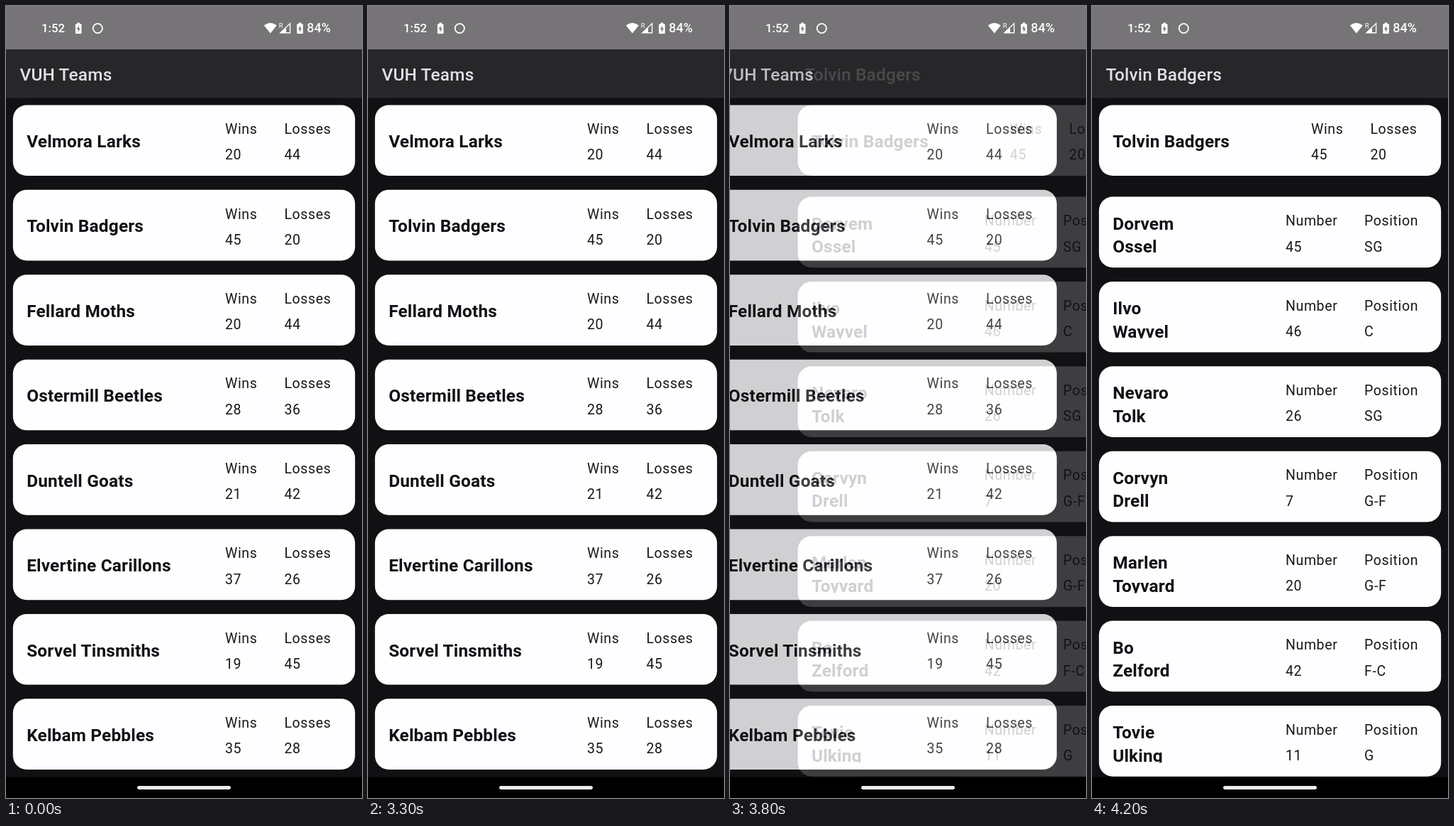
Animation, 502 px wide and 1115 px high, one loop 5400 ms. Source, as an HTML page:

```html
<!DOCTYPE html>
<html lang="en">
<head>
<meta charset="utf-8">
<title>Team list</title>
<style>
  html, body { margin: 0; width: 100%; height: 100%; overflow: hidden; background: #111013; }
  svg { font-family: Roboto, "Noto Sans", sans-serif; }
  #stage { display: block; width: 100%; height: 100%; }
  .title { font-size: 24.4px; font-weight: 500; letter-spacing: .18px; fill: #e2e0e4; }
  .name { font-size: 24.4px; font-weight: 700; letter-spacing: .18px; fill: #111014; }
  .stat { font-size: 19.53px; letter-spacing: .61px; fill: #19181b; }
  .status { font-weight: 500; fill: #fff; }
</style>
</head>
<body>
<svg id="stage" viewBox="0 0 502 1115">
  <g id="list"></g>
  <g id="detail"></g>

  <rect width="502" height="61" fill="#767477"/>
  <g fill="#fff">
    <text class="status" x="50" y="37.4" font-size="16.7">1:52</text>
    <g id="battery">
      <path d="M100.4 25.3v-1.700h3.600v1.700h1.500q1 0 1 1v11.800q0 1-1 1h-6.600q-1 0-1-1v-11.800q0-1 1-1z"/>
      <path d="M102.700 27.500l-3 5.300h2v4l3-5.300h-2z" fill="#767477"/>
    </g>
    <circle cx="129.300" cy="31.500" r="6.600" fill="none" stroke="#fff" stroke-width="1.800"/>
    <path d="M372.800 38.500L363.800 27.300Q372.800 20.300 381.800 27.300Z"/>
    <path d="M387 37.800L400.600 24.600V37.800Z" fill="none" stroke="#fff" stroke-width="1.400"/>
    <path d="M387 38L395 30.300V38Z"/>
    <text x="384.800" y="30.500" font-size="9.500">R</text>
    <use href="#battery" x="312.300"/>
    <text class="status" x="424.300" y="37.400" font-size="17.900">84%</text>
  </g>

  <rect y="1085.500" width="502" height="29.500" fill="#000"/>
  <rect x="185" y="1098" width="132" height="4.900" rx="2.450" fill="#eee"/>
</svg>

<script>
const LOOP = 5400, SWITCH = 3800, STEP = 100;
const CARD_PITCH = 119.42, FIRST_CARD = 139.4, FIRST_PLAYER = 268.5;

const teams = [
  ["Velmora Larks", 20, 44],
  ["Tolvin Badgers", 45, 20],
  ["Fellard Moths", 20, 44],
  ["Ostermill Beetles", 28, 36],
  ["Duntell Goats", 21, 42],
  ["Elvertine Carillons", 37, 26],
  ["Sorvel Tinsmiths", 19, 45],
  ["Kelbam Pebbles", 35, 28]
];
const players = [
  ["Dorvem", "Ossel", 45, "SG"],
  ["Ilvo", "Wayvel", 46, "C"],
  ["Nevaro", "Tolk", 26, "SG"],
  ["Corvyn", "Drell", 7, "G-F"],
  ["Marlen", "Toyvard", 20, "G-F"],
  ["Bo", "Zelford", 42, "F-C"],
  ["Tovie", "Ulking", 11, "G"]
];

const text = (kind, x, y, value) => `<text class="${kind}" x="${x}" y="${y}">${value}</text>`;

const stat = (x, label, value) => text("stat", x, 40.7, label) + text("stat", x, 77, value);

const card = (y, content) => `<g transform="translate(0 ${y})">
  <rect x="9.8" width="482.4" height="99.7" rx="19.5" fill="#fefdff"/>${content}</g>`;

const teamCard = ([name, wins, losses], y) => card(y,
  text("name", 29.2, 59.6, name) + stat(309, "Wins", wins) + stat(392.5, "Losses", losses));

// The inner viewport cuts off the descenders of the second name line.
const playerCard = ([first, last, number, position], y) => card(y,
  `<svg width="260" height="80.2">${text("name", 29.2, 46, first)}${text("name", 29.2, 78.7, last)}</svg>` +
  stat(273, "Number", number) + stat(384, "Position", position));

const screen = (title, cards) => `
  <rect y="61" width="502" height="1025" fill="#111013"/>
  <rect y="61" width="502" height="68.5" fill="#272628"/>
  <g class="slide">${text("title", 19.5, 105.2, title)}${cards.join("")}</g>`;

const list = document.getElementById("list");
const detail = document.getElementById("detail");
list.innerHTML = screen("VUH Teams",
  teams.map((team, i) => teamCard(team, FIRST_CARD + i * CARD_PITCH)));
detail.innerHTML = screen(teams[1][0], [
  teamCard(teams[1], FIRST_CARD),
  ...players.map((player, i) => playerCard(player, FIRST_PLAYER + i * CARD_PITCH))
]);

const slide = (layer, x) =>
  layer.querySelector(".slide").setAttribute("transform", `translate(${x} 0)`);

function render(time) {
  const step = Math.floor((time - SWITCH) / STEP);
  const opening = step >= 0;
  slide(list, opening ? -31.4 : 0);
  slide(detail, step < 4 ? 85.8 * Math.pow(0.13, Math.max(step, 0)) : 0);
  detail.setAttribute("opacity", step === 0 ? 0.19 : 1);
  detail.setAttribute("visibility", opening ? "visible" : "hidden");
}

const start = performance.now();
function tick() {
  render((performance.now() - start) % LOOP);
  requestAnimationFrame(tick);
}
tick();
</script>
</body>
</html>
```
